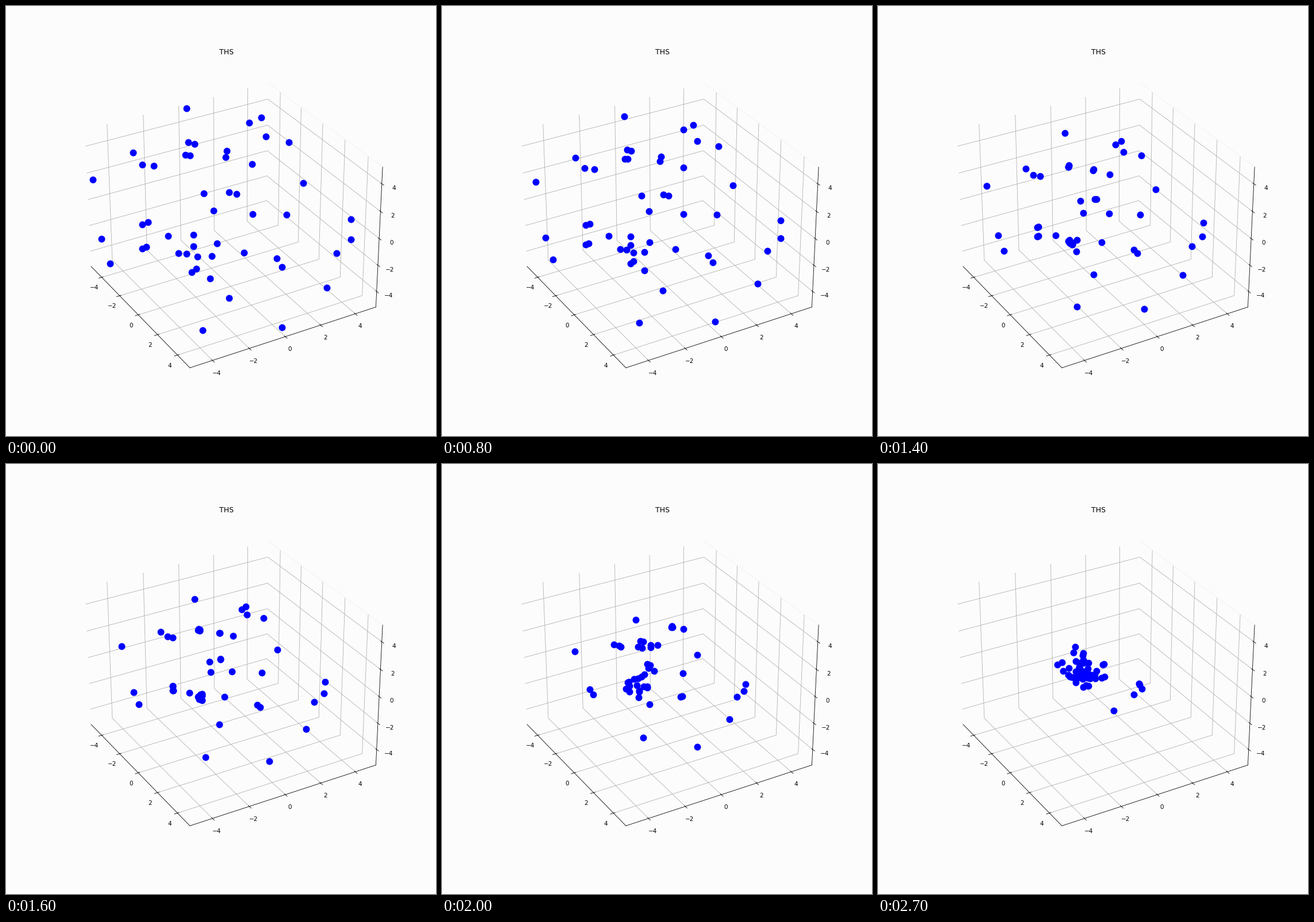
Animation, 748 px wide and 748 px high, one loop 2.8 s. Source, as a matplotlib script:

```python
import numpy as np
import matplotlib.pyplot as plt
from matplotlib.animation import FuncAnimation

SIZE, DPI = 748, 74.8
FRAMES, STEP = 28, 100
SUBSTEPS = 20
PULL = 500 / 1600**2    # attraction between two dots, px² per ms²
SOFT = 20               # keeps close passes gentle, px
PAPER = "#fcfcfc"
HALF = 5 + 10 / 48

# Where the dots rest before they fall together, in stage pixels.
START = np.array([
    (314, 178), (444, 194), (423, 203), (452, 227), (492, 237),
    (317, 237), (328, 240), (384, 252), (382, 263), (221, 255),
    (312, 259), (320, 260), (237, 276), (257, 278), (428, 275),
    (151, 302), (517, 308), (344, 326), (388, 324), (401, 327),
    (361, 356), (429, 362), (488, 363), (600, 371), (600, 406),
    (237, 380), (247, 376), (166, 405), (282, 400), (326, 398),
    (367, 413), (326, 418), (237, 422), (244, 419), (300, 430),
    (314, 431), (333, 436), (358, 435), (414, 429), (471, 439),
    (480, 454), (575, 430), (181, 448), (323, 463), (331, 457),
    (355, 474), (388, 508), (558, 490), (480, 559), (342, 564)], float)


def gravity(pos):
    """Pull of all dots on each; 1/r averages over their unseen depth."""
    gap = pos[None, :] - pos[:, None]
    dist2 = (gap**2).sum(axis=2, keepdims=True) + SOFT**2
    return PULL * (gap / dist2).sum(axis=1)


def collapse():
    """Leapfrog integration from rest, one pose per frame."""
    dt = STEP / SUBSTEPS
    pos, vel = START.copy(), np.zeros_like(START)
    poses = [pos.copy()]
    for _ in range(FRAMES - 1):
        for _ in range(SUBSTEPS):
            vel += gravity(pos) * dt / 2
            pos += vel * dt
            vel += gravity(pos) * dt / 2
        poses.append(pos.copy())
    return poses


def draw_box(fig):
    ax = fig.add_subplot(projection="3d", facecolor="none")
    ax.view_init(elev=30, azim=-30)
    ax.plot([-HALF, HALF], [HALF, HALF], [HALF, HALF], color="#f1f1f1", lw=0.8)
    ax.set(xlim=(-HALF, HALF), ylim=(-HALF, HALF), zlim=(-HALF, HALF))
    for axis in (ax.xaxis, ax.yaxis, ax.zaxis):
        axis.pane.set_visible(False)
        axis.set_ticks(range(-4, 5, 2))
    ax.set_title("THS")


def draw_dots(fig):
    stage = fig.add_axes([0, 0, 1, 1])
    stage.set(xlim=(0, SIZE), ylim=(SIZE, 0))
    stage.axis("off")
    return stage.scatter(*START.T, s=100, color="blue", linewidths=1.5)


fig = plt.figure(figsize=(SIZE / DPI, SIZE / DPI), dpi=DPI, facecolor=PAPER)
draw_box(fig)
dots = draw_dots(fig)
poses = collapse()


def update(frame):
    dots.set_offsets(poses[frame])
    return (dots,)


anim = FuncAnimation(fig, update, frames=FRAMES, interval=STEP,
                     repeat=True, repeat_delay=0)
plt.show()
```
